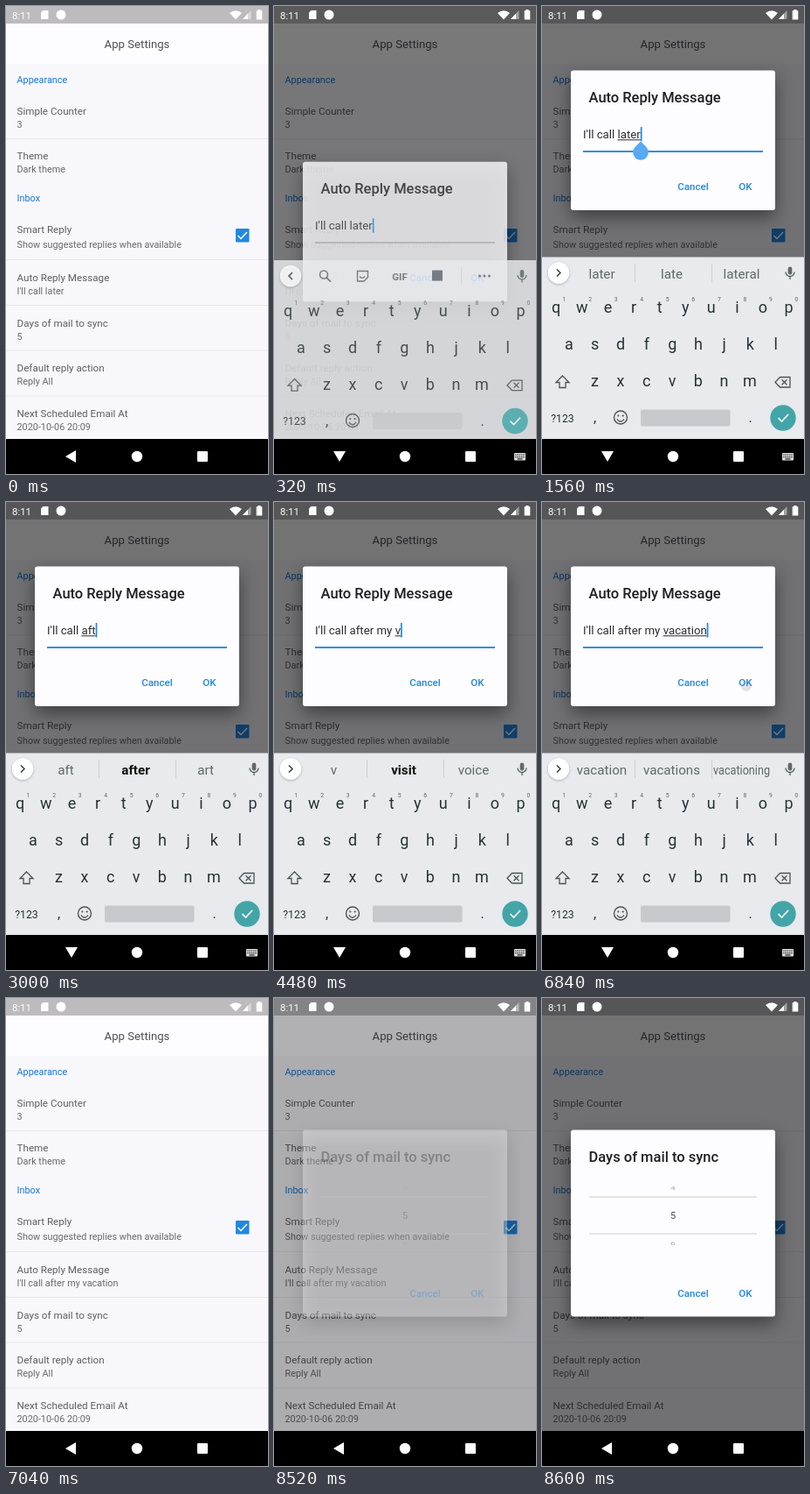
An HTML page with a canvas that plays this animation: 300 px wide and 534 px high, repeating every 9400 ms.

```html
<!DOCTYPE html>
<html lang="en">
<head>
<meta charset="utf-8">
<title>App Settings</title>
<style>
html, body { margin: 0; width: 100%; height: 100%; overflow: hidden; background: #000 }
canvas { display: block; width: 300px; height: 534px }
</style>
</head>
<body>
<canvas id="stage"></canvas>
<script>
const canvas = document.getElementById('stage'), g = canvas.getContext('2d');
const dpr = window.devicePixelRatio || 1;
canvas.width = 300 * dpr;
canvas.height = 534 * dpr;

const LOOP = 9400, STEP = 40;
const BLUE = '#1e88e5', INK = '#263238', SLATE = '#5f686d', PANEL = '#fdfcfe';
const clamp = v => Math.max(0, Math.min(1, v));
const ramp = (t, from, to) => clamp((t - from) / (to - from));
const easeOut = p => 1 - (1 - p) ** 2;

// Time, text after "I'll call ", suggestions (a leading * marks the bold one)
const typing = [
  [580, 'later', 'later late lateral'],
  [1960, 'late', 'late later lately'],
  [2080, 'lat', 'lat *last late'],
  [2240, 'la', 'la *last lab'],
  [2400, 'l', 'l *like lol'],
  [2520, '', 'them you back'],
  [2720, 'a', 'a and at'],
  [2920, 'af', 'af *after afar'],
  [3000, 'aft', 'aft *after art'],
  [3320, 'afte', 'afte *after afternoon'],
  [3440, 'after', 'after afternoon afterwards'],
  [3520, 'after ', 'work the I'],
  [3800, 'after m', 'm *my'],
  [3960, 'after my', 'my mine may'],
  [4080, 'after my ', 'daughter phone mother'],
  [4480, 'after my v', 'v *visit voice'],
  [4600, 'after my va', 'va *vacation van'],
  [4960, 'after my vac', 'vac *vacation vacuum'],
  [5040, 'after my vaca', 'vaca *vacation vacant'],
  [5280, 'after my vacat', 'vacat *vacation vacate'],
  [5360, 'after my vacati', 'vacati *vacation vacating'],
  [5440, 'after my vacatio', 'vacatio *vacation vacations'],
  [5640, 'after my vacation', 'vacation vacations vacationing']
];

function text(s, x, y, size, color, align = 'left', weight = 400, max) {
  g.font = `${weight} ${size}px Roboto, sans-serif`;
  g.fillStyle = color;
  g.textAlign = align;
  max ? g.fillText(s, x, y, max) : g.fillText(s, x, y);
}
function rect(x, y, w, h, color, r = 0) {
  g.fillStyle = color;
  g.beginPath();
  g.roundRect(x, y, w, h, r);
  g.fill();
}
function dot(x, y, r, color) {
  g.fillStyle = color;
  g.beginPath();
  g.arc(x, y, r, 0, 7);
  g.fill();
}
function ring(x, y, r, color, w, from = 0, to = 2 * Math.PI) {
  g.strokeStyle = color;
  g.lineWidth = w;
  g.beginPath();
  g.arc(x, y, r, from, to);
  g.stroke();
}
// SVG path data, filled or stroked when a width is given
function path(d, color, w) {
  const p = new Path2D(d);
  g.fillStyle = g.strokeStyle = color;
  g.lineWidth = w || 1;
  w ? g.stroke(p) : g.fill(p);
}

function settings(reply) {
  rect(0, 0, 300, 494, '#f8f7fb');
  rect(0, 20, 300, 46, '#fdfcfe');
  rect(0, 0, 300, 20, '#bdbbbe');
  text('App Settings', 150, 48, 13.2, '#504f53', 'center');
  text('Appearance', 12.5, 87.5, 10.87, '#1976d2');
  text('Inbox', 12.5, 222.5, 10.87, '#1976d2');
  const rows = [
    [123.5, 'Simple Counter', '3', 151],
    [175, 'Theme', 'Dark theme'],
    [258.5, 'Smart Reply', 'Show suggested replies when available', 289],
    [313.5, 'Auto Reply Message', reply, 341],
    [365.5, 'Days of mail to sync', '5', 392.5],
    [417, 'Default reply action', 'Reply All', 444.5],
    [468.5, 'Next Scheduled Email At', '2020-10-06 20:09']
  ];
  for (const [y, title, sub, rule] of rows) {
    text(title, 12.5, y, 11.67, '#5f5e62');
    text(sub, 12.5, y + (title === 'Smart Reply' ? 17 : 15.3), 10.85, '#6a696d');
    if (rule) rect(0, rule, 300, 1, '#e9e7eb');
  }
  rect(263, 254, 15.5, 15.5, BLUE, 1);
  path('M265.5 262l3.5 3.5 7-7.5', '#fff', 1.5);
}

function statusIcons() {
  text('8:11', 7, 14.5, 11.4, '#fff');
  path('M42.5 5H48.5V15H40V7.5Z', '#fff');
  dot(63, 10, 5.5, '#fff');
  path('M256 8Q263 2.5 270 8L263 15.5Z', '#fff');
  path('M271 15L280.5 5V15Z', 'rgba(255,255,255,.45)');
  path('M271 15L277 8.7V15Z', '#fff');
  path('M288.5 4h3v1.2h1.8V15.5h-6.6V5.2h1.8Z', '#fff');
}

function navBar(typingMode) {
  rect(0, 494, 300, 40, '#000');
  path(typingMode ? 'M68 508H82L75 520Z' : 'M68 514L80 507V521Z', '#fff');
  dot(150, 514, 6.2, '#fff');
  rect(219, 508, 12, 12, '#fff', 1);
  if (!typingMode) return;
  rect(275, 510, 13, 8.5, '#ddd', 1);
  for (let i = 0; i < 5; i++)
    for (const y of [511.5, 514]) rect(276.3 + i * 2.3, y, 1.2, 1.2, '#000');
  rect(278.5, 516.4, 6, 1, '#000');
}

function panel(y, h, title) {
  g.save();
  g.shadowColor = 'rgba(0,0,0,.45)';
  g.shadowBlur = 20 * dpr;
  g.shadowOffsetY = 8 * dpr;
  rect(33, y, 234, h, PANEL, 3);
  g.restore();
  text(title, 53.5, y + 36.5, 16.5, '#1f1f21', 'left', 500);
}
function buttons(y) {
  text('Cancel', 173, y, 11.6, BLUE, 'center', 500);
  text('OK', 233, y, 11.6, BLUE, 'center', 500);
}

function replyDialog(t, state) {
  const [since, word] = state, full = "I'll call " + word;
  const ready = t >= 580;
  panel(73.5, 159.5, 'Auto Reply Message');
  if (t >= 6760 && t < 6960) dot(234, 210, 6, 'rgba(0,0,0,.1)');
  text(full, 47, 150.5, 13.25, '#2c2c2e');
  const measure = s => g.measureText(s).width;
  const end = 47 + measure(full);
  const lastWord = full.split(' ').pop();
  if (ready && lastWord) {
    const w = measure(lastWord);
    rect(end - w, 152.3, w, 1, '#2c2c2e');
  }
  rect(47, 165.2, 206, 1, '#858487');
  const focus = ramp(t, 380, 560);
  if (focus) {
    g.save();
    g.globalAlpha *= focus;
    rect(47, 165, 206, 2, '#2f90e6');
    g.restore();
  }
  const blink = (t - since) % 1000;
  if (blink < 480 || blink >= 980) rect(end, 138, 1.7, 16.5, BLUE);
  if (t >= 440 && t < 1960) {
    dot(113, 167, 8.8, '#57a9f3');
    path('M113 154.6L119.3 160.8L113 167L106.7 160.8Z', '#57a9f3');
  }
  buttons(210);
}

function daysDialog() {
  panel(150.5, 213, 'Days of mail to sync');
  rect(54, 226.5, 192, 1, '#cecdd0');
  rect(54, 268.5, 192, 1, '#cecdd0');
  text('5', 150, 252, 11, '#4a494c', 'center');
  for (const [n, y] of [['4', 219], ['6', 282]]) {
    g.save();
    g.translate(150, y);
    g.scale(1, .55);
    text(n, 0, 0, 10.5, '#a3a2a5', 'center');
    g.restore();
  }
  buttons(341);
}

function toolbar() {
  ring(57, 303, 4.5, SLATE, 1.6);
  path('M60.3 306.5L65 311', SLATE, 1.8);
  path('M95.5 299H107.5V306L103 310.5H95.5Z', SLATE, 1.4);
  ring(101, 304, 2.8, SLATE, 1.2, .2, 2.9);
  text('GIF', 144, 309, 11.5, SLATE, 'center', 700);
  rect(181, 298, 12, 12, SLATE);
  rect(214, 294, 1, 20, '#cfd2d5');
  for (const x of [235.5, 241, 246.5]) dot(x, 304.5, 1.5, SLATE);
}
function suggestions(words) {
  rect(106, 294, 1, 21, '#cdd0d3');
  rect(194, 294, 1, 21, '#cdd0d3');
  words.split(' ').forEach((w, i) => {
    const bold = w[0] === '*';
    text(bold ? w.slice(1) : w, 68.5 + 80 * i, 310.5, 15.2,
      bold ? '#111' : SLATE, 'center', bold ? 700 : 400, 65);
  });
}

function keyboard(t, words) {
  const open = t >= 560;
  rect(0, 286.5, 300, 230, '#e8eaed');
  g.save();
  g.shadowColor = 'rgba(0,0,0,.25)';
  g.shadowBlur = 3 * dpr;
  g.shadowOffsetY = dpr;
  dot(19, 304.5, 12.3, '#fff');
  g.restore();
  path(open ? 'M17 300.5L21 304.5L17 308.5' : 'M21 300.5L17 304.5L21 308.5', '#3c4549', 1.6);
  open ? suggestions(words) : toolbar();
  rect(281.7, 297.5, 4.6, 9, SLATE, 2.3);
  path('M279 303.5a5 5 0 0 0 10 0M284 308.5V312', SLATE, 1.4);

  const row = (keys, x, y) => [...keys].forEach((k, i) =>
    text(k, x + i * 29.6, y, 18, INK, 'center'));
  row('qwertyuiop', 16.2, 350);
  row('asdfghjkl', 31, 392);
  row('zxcvbnm', 60.4, 434);
  [...'1234567890'].forEach((n, i) => text(n, 25.5 + i * 29.55, 337, 6.8, SLATE, 'center'));

  path('M23.5 422L31 429.5H27V435.5H20V429.5H16Z', '#4a5358', 1.3);
  path('M272.5 423.5H284V435H272.5L267 429.2Z', '#4a5358', 1.3);
  path('M274.5 426.2l6 6M280.5 426.2l-6 6', '#4a5358', 1.3);

  text('?123', 23.5, 474.5, 12.3, INK, 'center');
  text(',', 60.5, 475, 16, INK, 'center');
  text('.', 238.5, 475, 16, INK, 'center');
  ring(90, 469.5, 7.5, '#4a5358', 1.4);
  dot(87.3, 467.5, 1.1, '#4a5358');
  dot(92.7, 467.5, 1.1, '#4a5358');
  ring(90, 470, 4, '#4a5358', 1.3, .3, 2.85);
  rect(113, 460.5, 102.5, 19, '#c6c9cd', 2);
  dot(276, 470, 14.7, '#43a5a8');
  path('M270.5 470l4 4 7.5-8', '#fff', 1.7);
}

// Runs a drawing part at the given opacity, shifted down by dy
function layer(alpha, dy, draw) {
  if (alpha <= 0) return;
  g.save();
  g.globalAlpha = alpha;
  g.translate(0, dy);
  draw();
  g.restore();
}

function render(t) {
  const state = typing.findLast(s => s[0] <= t) || typing[0];
  const closing = t >= 6880;
  const dialog = closing ? 1 - ramp(t, 6860, 7020) : ramp(t, 200, 350);
  const keys = closing ? 1 - ramp(t, 6850, 6990) : ramp(t, 200, 346);
  const drop = closing ? ramp(t, 6920, 7040) ** 2 : 1 - easeOut(ramp(t, 360, 500));
  const days = ramp(t, 8480, 8600);

  g.setTransform(dpr, 0, 0, dpr, 0, 0);
  settings("I'll call " + (t < 6920 ? 'later' : 'after my vacation'));
  if (t >= 120 && t < 320) rect(0, 290, 300, 51, 'rgba(0,0,0,.06)');
  rect(0, 0, 300, 494, `rgba(0,0,0,${.54 * easeOut(Math.max(dialog, days))})`);
  layer(dialog, 104.3 * drop, () => replyDialog(t, state));
  layer(days, 0, daysDialog);
  layer(keys, 20 * (1 - keys), () => keyboard(t, state[2]));
  statusIcons();
  navBar(keys > 0);
}

const start = performance.now();
function tick() {
  const t = (performance.now() - start) % LOOP;
  render(Math.floor(t / STEP) * STEP);
  requestAnimationFrame(tick);
}
tick();
</script>
</body>
</html>
```
